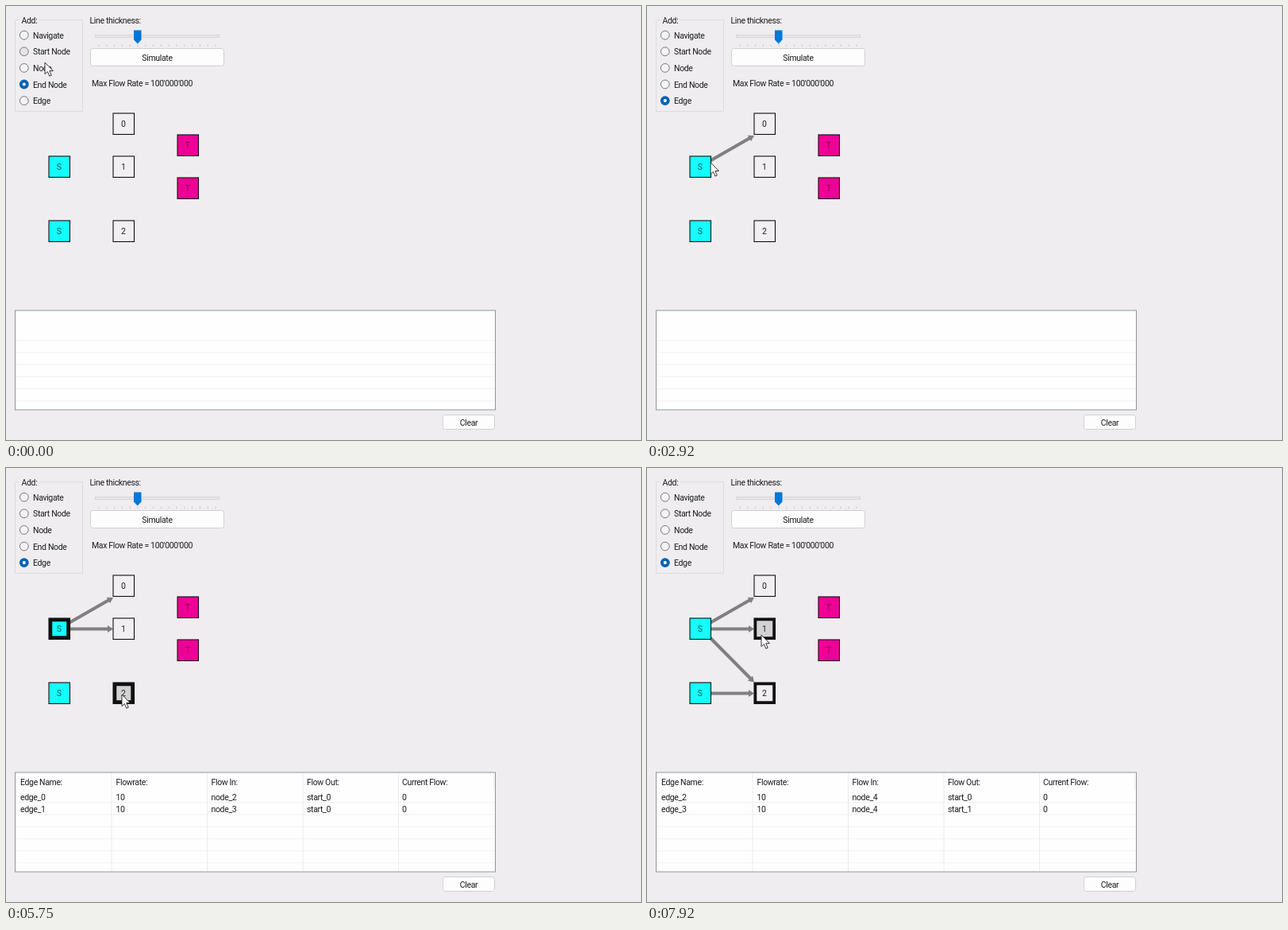
Write an HTML page that moves like this. It is 800x546 px and loops after 8 s.

```html
<!DOCTYPE html>
<html lang="en">
<head>
<meta charset="utf-8">
<title>Flow network editor</title>
<style>
  html, body { margin: 0; width: 100%; height: 100%; overflow: hidden; background: #efedf0; }
  svg { display: block; }
  text { font: 10.5px Roboto, "Liberation Sans", sans-serif; letter-spacing: -.35px; fill: #1c1c1c; white-space: pre; }
  .mid { text-anchor: middle; }
</style>
</head>
<body>
<svg id="stage" width="800" height="546" viewBox="0 0 800 546">
  <g id="panel"></g>
  <g id="scene"></g>
  <path id="cursor" d="M0 0V14.6L3.4 11.5 5.8 17.2 8.2 16.2 5.8 10.6H10.4Z" fill="#fff" stroke="#222" stroke-width=".9"/>
</svg>
<script>
const LOOP = 8000, FPS = 12, SIZE = 26.5;
const BLACK = '#111', CYAN = '#14fcfc', PINK = '#ef0096', PLAIN = '#f1eff1';

// x, y, label; the index is also the number in the node's name
const nodes = [
  [54, 189, 'S'], [54, 270, 'S'],
  [135, 135, '0'], [135, 189, '1'], [135, 270, '2'],
  [216, 162, 'T'], [216, 216, 'T']
];
const nodeName = i => (i < 2 ? 'start_' : 'node_') + i;

// Each link: time of first click, time of second click, both nodes, drawn line
const links = [
  { pick: 1910, drop: 2410, from: 0, to: 2, line: [80, 194.5, 135, 163] },
  { pick: 3160, drop: 3990, from: 0, to: 3, line: [81, 202.5, 135, 202.5] },
  { pick: 4910, drop: 5660, from: 0, to: 4, line: [80, 214, 135, 269.5] },
  { pick: 6410, drop: 6990, from: 1, to: 4, line: [81, 283.5, 135, 283.5] },
  { pick: 7320, drop: 7910, from: 4, to: 3 }
];
links.forEach(l => l.end = l.drop + 160);

// time, x, y
const pointer = [
  [0, 49, 71], [250, 37, 117], [1340, 37, 117], [1750, 65, 190], [1917, 66, 197],
  [2083, 66, 197], [2417, 145, 150], [2667, 145, 150], [2917, 80, 197], [3083, 68, 203],
  [3500, 68, 203], [3917, 145, 204], [4250, 145, 204], [4583, 87, 208], [4750, 68, 205],
  [5167, 68, 205], [5667, 146, 285], [5917, 146, 285], [6417, 71, 285],
  [6583, 71, 285], [6917, 145, 285], [7417, 145, 285], [7833, 144, 210], [LOOP, 144, 210]
];

const text = (x, y, s, cls = '', fill = '') =>
  `<text x="${x}" y="${y + 3.8}" class="${cls}" ${fill && `style="fill:${fill}"`}>${s}</text>`;
const rect = (x, y, w, h, fill, stroke, width = 1, r = 0) =>
  `<rect x="${x}" y="${y}" width="${w}" height="${h}" rx="${r}" fill="${fill}" stroke="${stroke}" stroke-width="${width}"/>`;
const path = (d, stroke, width = 1, fill = 'none') =>
  `<path d="${d}" stroke="${stroke}" stroke-width="${width}" fill="${fill}"/>`;
const button = (x, y, w, h, label) =>
  rect(x, y, w, h, '#fdfdfd', '#d0d0d0', 1, 3) + text(x + w / 2, y + h / 2 + .3, label, 'mid');

function panel() {
  let ticks = '', rows = '';
  for (let i = 0; i < 16; i++) ticks += `M${117 + i * 9.8} 48.5v2.5`;
  for (let i = 0; i < 6; i++) rows += `M12 ${420.8 + i * 15.2}H616`;
  return path('M17 17.5H11.5V132.5H96.5V17.5H42', '#dcdbdd') + text(19.5, 18, 'Add:') +
    text(105.5, 18, 'Line thickness:') +
    rect(112.5, 36.5, 156, 3, '#e7e6e8', '#d6d5d7') + path(ticks, '#c6c5c7') +
    path('M161 30.5H170.5V42.5L165.8 47.5 161 42.5Z', 'none', 0, '#0078d7') +
    button(106.5, 53.5, 168, 22, 'Simulate') +
    text(108, 97, "Max Flow Rate = 100'000'000") +
    rect(11.5, 383, 605, 125, '#fefefe', '#929498') + path(rows, '#f0eff2') +
    button(550.5, 514.5, 65, 18, 'Clear');
}

function radios(t) {
  const chosen = t < 495 ? 3 : 4;
  return ['Navigate', 'Start Node', 'Node', 'End Node', 'Edge'].map((label, i) => {
    const y = 36.7 + i * 20.6, on = i === chosen;
    const fill = on ? '#fff' : i === 1 && t < 80 ? '#e4e3e5' : '#f4f3f4';
    return `<circle cx="22.8" cy="${y}" r="${on ? 4 : 5.4}" fill="${fill}" stroke="${on ? '#0063b1' : '#777'}" stroke-width="${on ? 3.8 : 1}"/>` +
      text(34, y + .3, label);
  }).join('');
}

function arrow([x1, y1, x2, y2]) {
  const len = Math.hypot(x2 - x1, y2 - y1), angle = Math.atan2(y2 - y1, x2 - x1) * 180 / Math.PI;
  return `<path transform="translate(${x1} ${y1}) rotate(${angle})" fill="#808080"
    d="M0 -2.1H${len - 7}V-4.4L${len} 0 ${len - 7} 4.4V2.1H0Z"/>`;
}

function drawNode([x, y, label], i, t, link) {
  const isFrom = link && link.from === i;
  const isTo = link && link.to === i && t >= link.drop;
  const pressed = isTo || isFrom && t < link.pick + 160;
  const width = !isFrom && !isTo ? 1.1 : link.pick > 7000 ? 3.8 : 4.8;
  const [fill, ink] = label === 'S' ? [pressed ? '#66dcdc' : CYAN, '#0b5a5a']
    : label === 'T' ? [PINK, '#8a0058']
    : [pressed ? '#d2d1d3' : PLAIN, '#222'];
  const inset = (width - 1.1) / 2;
  return rect(x + inset, y + inset, SIZE - inset * 2, SIZE - inset * 2, fill, BLACK, width) +
    text(x + 12.8, y + 13.2, label, 'mid', ink);
}

function table(edges, selected) {
  const columns = [18, 138.5, 258.5, 379, 499];
  const row = (y, cells) => cells.map((s, i) => text(columns[i], y, s)).join('');
  let out = path('M133 384V507M253.5 384V507M374 384V507M494.5 384V507M614.5 384V405', '#ebeaed') +
    row(395, ['Edge Name:', 'Flowrate:', 'Flow In:', 'Flow Out:', 'Current Flow:']);
  edges.map((e, i) => ['edge_' + i, 10, nodeName(e.to), nodeName(e.from), 0, e])
    .filter(r => r[5].from === selected || r[5].to === selected)
    .forEach((r, i) => out += row(414 + i * 15.2, r.slice(0, 5)));
  return out;
}

function pointerAt(t) {
  const k = pointer.findIndex(p => p[0] > t);
  const [t0, x0, y0] = pointer[k - 1], [t1, x1, y1] = pointer[k];
  const u = (t - t0) / (t1 - t0);
  return [x0 + (x1 - x0) * u, y0 + (y1 - y0) * u];
}

const $ = id => document.getElementById(id);
let lastStep = -1;

function draw() {
  const step = Math.floor((performance.now() % LOOP + 4) * FPS / 1000) % (LOOP * FPS / 1000);
  if (step !== lastStep) {
    lastStep = step;
    const t = step * 1000 / FPS;
    const link = links.find(l => t >= l.pick && t < l.end);
    const edges = links.filter(l => l.line && t >= l.end);
    $('scene').innerHTML = radios(t) + edges.map(e => arrow(e.line)).join('') +
      nodes.map((n, i) => drawNode(n, i, t, link)).join('') +
      (link && t >= link.pick + 80 ? table(edges, link.from) : '');
    $('cursor').setAttribute('transform', `translate(${pointerAt(t)})`);
  }
  requestAnimationFrame(draw);
}

$('panel').innerHTML = panel();
draw();
</script>
</body>
</html>
```
